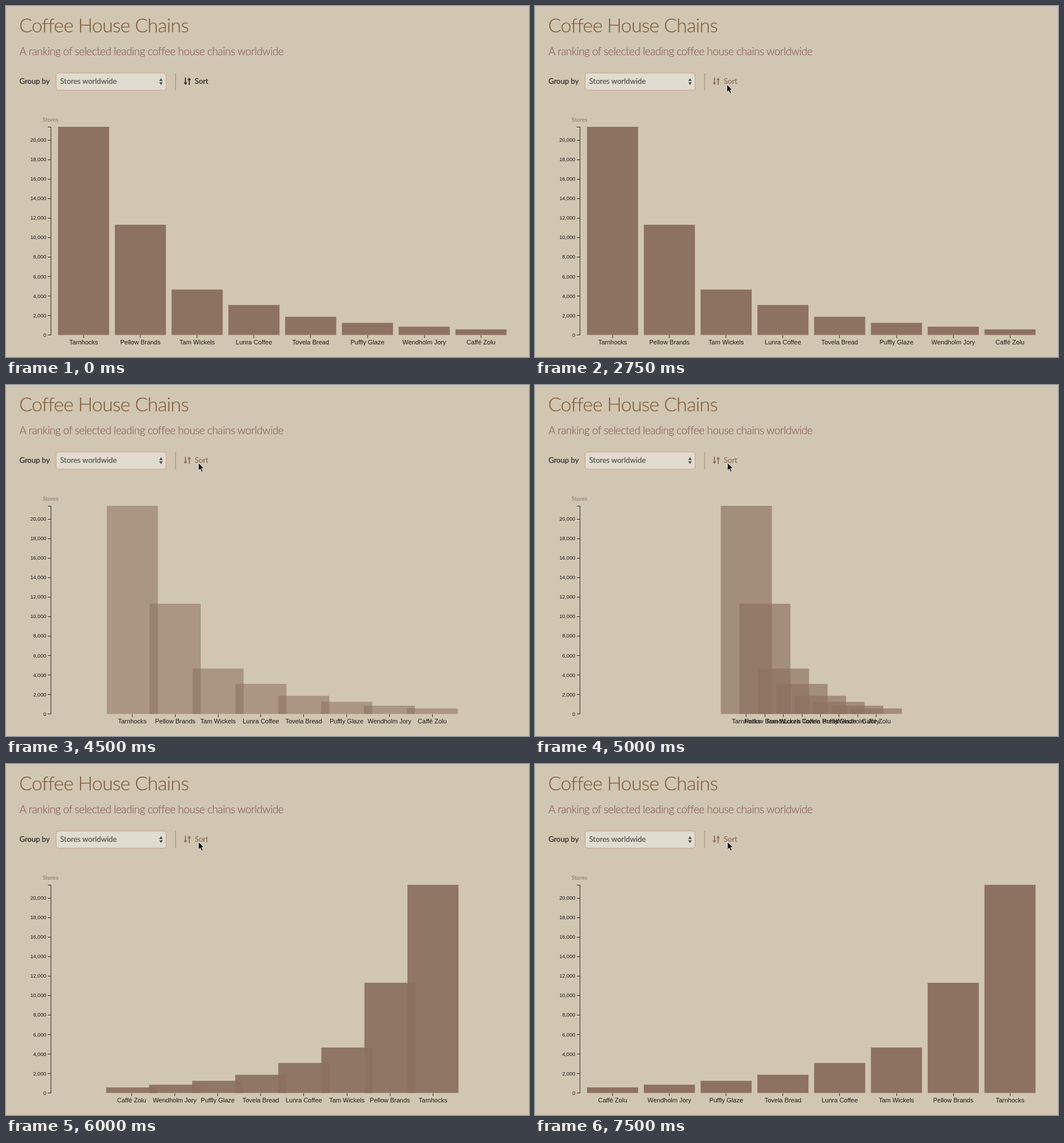
Write an HTML page that moves like this. It is 913 by 613 pixels and loops after 8 s.

```html
<!DOCTYPE html>
<html lang="en">
<head>
<meta charset="utf-8">
<title>Coffee House Chains</title>
<style>
  html, body { margin: 0; width: 100%; height: 100%; overflow: hidden; background: #d1c6b1; }
  svg { display: block; color: #2d2a29; }
  text { font: 13px Lato, sans-serif; fill: currentColor; }
  .ui text { stroke: currentColor; stroke-width: .2px; }
  .title, .subtitle { font-weight: 300; letter-spacing: -.0216em; }
  .title { font-size: 33.8px; color: #835f3f; }
  .subtitle { font-size: 18.7px; color: #8b6062; }
  .unit { font-size: 10px; color: #98817a; }
  .chosen { color: #55504c; }
  .axis text { font: 9.1px "Liberation Sans", Arial, sans-serif; fill: #1c1a19; text-anchor: end; }
  .axis path, .tick { fill: none; stroke: #2b2725; shape-rendering: crispEdges; }
  .bar rect { fill: #8d7161; }
  .bar text { font: 11px "Liberation Sans", Arial, sans-serif; fill: #1c1a19; text-anchor: middle; }
</style>
</head>
<body>
<svg id="stage" width="913" height="613" viewBox="0 0 913 613">
  <g class="ui">
    <text class="title" x="23" y="46">Coffee House Chains</text>
    <text class="subtitle" x="23.5" y="86">A ranking of selected leading coffee house chains worldwide</text>

    <text x="23.5" y="135.7">Group by</text>
    <rect x="87.5" y="117" width="192" height="30" rx="4" fill="#e0dccf" stroke="#cb9d8f"/>
    <text class="chosen" x="94.5" y="136.3">Stores worldwide</text>
    <path d="M267.5 131 L270.6 126.3 L273.7 131z M267.5 133.2 H273.7 L270.6 137.9z" fill="#4a4643"/>
    <path d="M296 117 V147" stroke="#958880"/>

    <g id="sort">
      <path d="M313.3 125 V135 M319.8 138 V128" fill="none" stroke="currentColor" stroke-width="1.8"/>
      <path d="M310.2 133.6 H316.4 L313.3 138z M316.7 129.4 H322.9 L319.8 125z" fill="currentColor"/>
      <text x="329.5" y="136.3">Sort</text>
    </g>

    <text class="unit" x="64" y="202">Stores</text>
  </g>
  <g class="axis" id="axis"><path d="M73 211.5 H78.5 V574.5 H73"/></g>
  <g id="bars"></g>
  <path id="cursor" d="M1 1 V14.5 L4.1 11.7 L6.3 16.7 L8.7 15.7 L6.5 10.8 H10.7z"
        fill="#000" stroke="#fff" stroke-width=".9"/>
</svg>
<script>
const LOOP = 8000, STEP = 250;
const BASE = 574.5, PX_PER_STORE = 363.5 / 21366;
const LEFT = 90.9, PITCH = 99.1, BAR_WIDTH = 89.2;
const HOVER_START = 2750, SORT_START = 3250, SORT_TIME = 3994;

const chains = [
  ["Tarnhocks", 21366], ["Pellow Brands", 11310], ["Tam Wickels", 4660], ["Lunra Coffee", 3080],
  ["Tovela Bread", 1870], ["Puffly Glaze", 1245], ["Wendholm Jory", 850], ["Caffé Zolu", 570]
];

// Pointer stops: time, x, y
const pointer = [
  [750, 453, 168], [1000, 347, 202], [1250, 332, 147.5],
  [1500, 332.5, 136], [2750, 334, 136], [3000, 335, 135]
];

const byId = id => document.getElementById(id);
function add(parent, tag, attrs, text = "") {
  const node = document.createElementNS("http://www.w3.org/2000/svg", tag);
  for (const key in attrs) node.setAttribute(key, attrs[key]);
  node.textContent = text;
  return parent.appendChild(node);
}

for (let value = 0; value <= 20000; value += 2000) {
  const y = BASE - value * PX_PER_STORE;
  add(byId("axis"), "path", { d: `M73 ${Math.floor(y) + .5} H78.5` });
  add(byId("axis"), "text", { x: 70.3, y: y + 3.1 }, value.toLocaleString("en-US"));
}

const bars = chains.map(([name, stores]) => {
  const group = add(byId("bars"), "g", { class: "bar" });
  const height = stores * PX_PER_STORE;
  const rect = add(group, "rect", { y: BASE - height, width: BAR_WIDTH, height });
  const tick = add(group, "path", { class: "tick" });
  const label = add(group, "text", { y: 591 }, name);
  return { rect, tick, label };
});

const cubicInOut = u => u < .5 ? 4 * u ** 3 : 1 - 4 * (1 - u) ** 3;

function draw(time) {
  // The picture refreshes four times a second.
  const now = Math.floor(time % LOOP / STEP) * STEP;
  const progress = Math.min(1, Math.max(0, (now - SORT_START) / SORT_TIME));
  const eased = cubicInOut(progress);
  const opacity = progress > 0 ? .5 + .5 * eased : 1;

  bars.forEach(({ rect, tick, label }, i) => {
    const slot = i + (bars.length - 1 - 2 * i) * eased;
    const x = LEFT + PITCH * slot, middle = x + BAR_WIDTH / 2;
    rect.setAttribute("x", x);
    rect.setAttribute("opacity", opacity);
    tick.setAttribute("d", `M${Math.floor(middle) + .5} 575 V580`);
    label.setAttribute("x", middle);
  });

  byId("sort").style.color = now >= HOVER_START ? "#8d6f62" : "";
  const stop = pointer.filter(([start]) => start <= now).pop();
  byId("cursor").style.display = stop ? "" : "none";
  if (stop) byId("cursor").setAttribute("transform", `translate(${stop[1]} ${stop[2]})`);
}

const start = performance.now();
function frame() {
  draw(performance.now() - start);
  requestAnimationFrame(frame);
}
frame();
</script>
</body>
</html>
```
